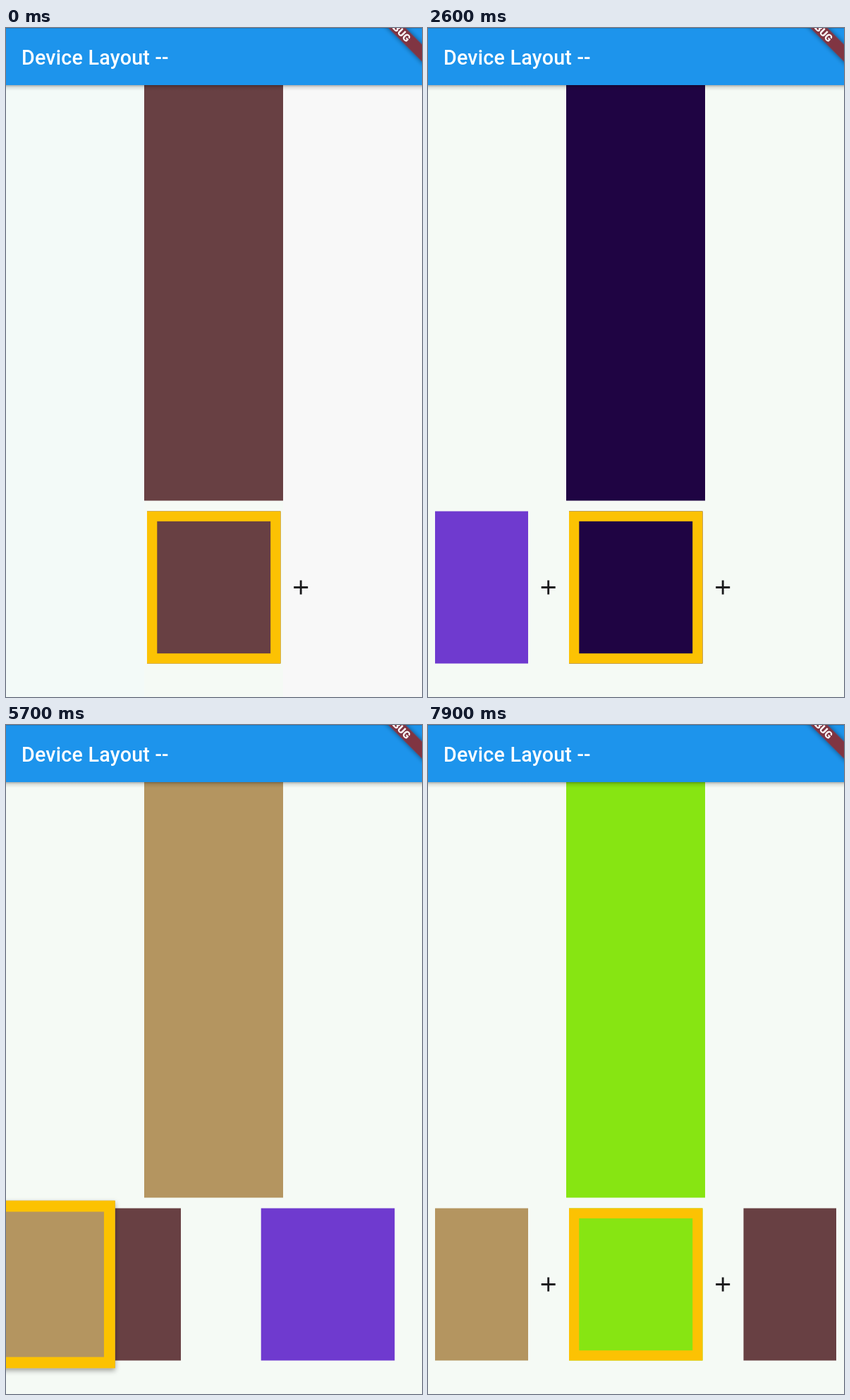
Recreate the animation shown at these times as an HTML page. Size 590x949 px, loop 8 s.

```html
<!DOCTYPE html>
<html lang="en">
<head>
<meta charset="utf-8">
<title>Device Layout</title>
<style>
  html, body { margin: 0; width: 100%; height: 100%; overflow: hidden; background: #f5faf5; }
  svg { display: block; width: 100%; height: 100%; }
  text { font-family: Roboto, sans-serif; fill: #fff; }
</style>
</head>
<body>
<svg viewBox="0 0 590 949">
  <defs>
    <clipPath id="list"><rect x="10" y="670" width="569" height="279"/></clipPath>
    <filter id="lift" x="-20%" y="-20%" width="140%" height="140%">
      <feDropShadow dx="0" dy="3" stdDeviation="3.5" flood-opacity=".36"/>
    </filter>
    <filter id="soft" x="-30%" y="-100%" width="160%" height="300%">
      <feDropShadow dx="0" dy="0" stdDeviation="3.5" flood-opacity=".5"/>
    </filter>
    <linearGradient id="fade" x2="0" y2="1">
      <stop offset="0" stop-opacity=".3"/>
      <stop offset=".4" stop-opacity=".1"/>
      <stop offset="1" stop-opacity="0"/>
    </linearGradient>
  </defs>
  <rect width="590" height="949" fill="#f5faf5"/>
  <g id="tint">
    <rect width="196" height="949" fill="#f3faf8"/>
    <rect x="393" width="197" height="949" fill="#f8f8f8"/>
  </g>
  <rect id="panel" x="196" y="81" width="197" height="589.5"/>
  <rect y="81" width="590" height="8" fill="url(#fade)"/>
  <rect width="590" height="81" fill="#1d94ec"/>
  <rect width="590" height="1" fill="#1a7fc9"/>
  <text x="22" y="51.5" font-size="28.7" font-weight="500" letter-spacing=".2">Device Layout --</text>
  <g transform="translate(555 .5) rotate(45)">
    <rect x="-80" y="-8.6" width="160" height="17.2" fill="#803543" filter="url(#soft)"/>
    <text y="5.2" font-size="14.6" font-weight="900" text-anchor="middle">DEBUG</text>
  </g>
  <g id="strip" clip-path="url(#list)"></g>
  <g id="overlay"></g>
</svg>
<script>
const LOOP = 8000, PITCH = 247.5, WIDTH = 189.5, TOP = 685.5, HEIGHT = 216, EDGE = 14.3;
const LIFT = 4300, DROP = 6450;
const COLORS = {
  brown: '#684043', purple: '#6f3acf', dark: '#1f0443', tan: '#b49560', green: '#87e512'
};

// Each step: start time, order of tiles, selected tile, list origin before and after.
const STEPS = [
  [0, ['brown'], 'brown', 200, 200],
  [800, ['brown', 'purple'], 'purple', 200, 200 - PITCH],
  [2000, ['brown', 'purple', 'dark'], 'dark', 200 - PITCH, 200 - 2 * PITCH],
  [3400, ['brown', 'purple', 'tan', 'dark'], 'tan', 200 - 2 * PITCH, 200 - 2 * PITCH],
  [DROP, ['tan', 'brown', 'purple', 'dark'], 'tan', 147.7, 147.7],
  [7200, ['tan', 'green', 'brown', 'purple', 'dark'], 'green', 147.7, 200 - PITCH]
];

// Tile positions while one tile is being carried: [time, x] pairs.
const CARRY = {
  brown: [[4800, 200 - 2 * PITCH], [5700, 58], [6350, 395]],
  purple: [[4800, 200 - PITCH], [5700, 361.3], [6350, 642.7]],
  dark: [[4800, 200 + PITCH], [5700, 608.8], [6350, 890]]
};
const HELD = [[4500, 200], [5100, -44.3], [6200, -44.3], [DROP, 147.7]];

const byId = id => document.getElementById(id);
const clamp = v => Math.max(0, Math.min(1, v));
const ease = v => { v = clamp(v); return v * v * (3 - 2 * v); };
const keyed = (keys, t, curve = clamp) => keys.slice(1).reduce(
  (x, [end, to], i) => x + (to - keys[i][1]) * curve((t - keys[i][0]) / (end - keys[i][0])),
  keys[0][1]);

function add(parent, name, attrs) {
  const el = document.createElementNS('http://www.w3.org/2000/svg', name);
  for (const key in attrs) el.setAttribute(key, attrs[key]);
  return parent.appendChild(el);
}

const strip = byId('strip'), overlay = byId('overlay');

function makeTile(parent, color) {
  const group = add(parent, 'g', {});
  add(group, 'rect', { width: WIDTH, height: HEIGHT, fill: color });
  const border = add(group, 'rect', {
    x: EDGE / 2, y: EDGE / 2, width: WIDTH - EDGE, height: HEIGHT - EDGE,
    fill: 'none', stroke: '#fcc203', 'stroke-width': EDGE
  });
  return { group, border };
}

const tiles = {};
for (const name in COLORS) tiles[name] = makeTile(strip, COLORS[name]);
const held = makeTile(overlay, COLORS.tan);
held.group.setAttribute('filter', 'url(#lift)');
const pluses = Array.from({ length: 5 }, () =>
  add(strip, 'path', { d: 'M-10 0H10M0-10V10', stroke: '#1c1c1e', 'stroke-width': 2.87 }));

const show = (el, on) => el.setAttribute('display', on ? 'inline' : 'none');
const move = (el, x, y) => el.setAttribute('transform', `translate(${x} ${y})`);

function render(t) {
  const [start, order, selected, from, to] = STEPS.filter(step => step[0] <= t).pop();
  const origin = from + (to - from) * ease((t - start) / 300);
  const carrying = t >= LIFT && t < DROP;

  show(byId('tint'), t < 100);
  byId('panel').setAttribute('fill', COLORS[selected]);

  for (const name in tiles) {
    const index = order.indexOf(name), { group, border } = tiles[name];
    show(group, index >= 0 && !(carrying && name === 'tan'));
    show(border, name === selected);
    const x = carrying && CARRY[name] ? keyed(CARRY[name], t) : origin + index * PITCH;
    move(group, x, TOP);
  }
  pluses.forEach((plus, i) => {
    show(plus, !carrying && i < order.length);
    move(plus, origin + i * PITCH + 218.2, 793.5);
  });

  show(overlay, carrying);
  if (carrying) {
    const scale = 1 + 0.1 * ease((t - LIFT) / 200) * (1 - ease((t - 6250) / 200));
    const x = keyed(HELD, t, ease) - WIDTH * (scale - 1) / 2;
    const y = TOP + HEIGHT * (1 - scale) / 2;
    held.group.setAttribute('transform', `translate(${x} ${y}) scale(${scale})`);
  }
}

const began = performance.now();
function tick() {
  render((performance.now() - began) % LOOP);
  requestAnimationFrame(tick);
}
tick();
</script>
</body>
</html>
```
